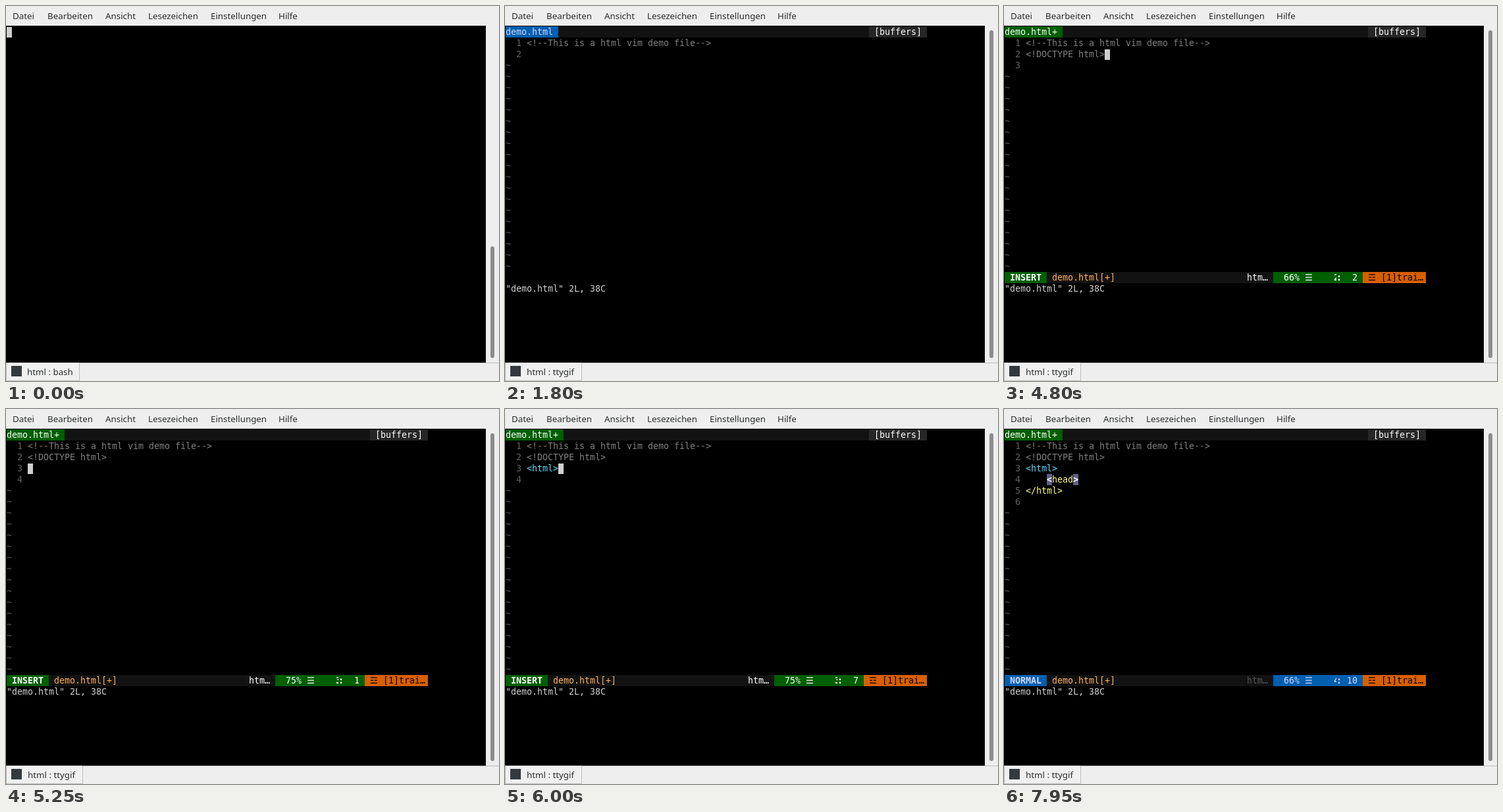
An HTML page with a canvas that plays this animation: 749x571 px, repeating every 8000 ms.

```html
<!DOCTYPE html>
<html lang="de">
<head>
<meta charset="utf-8">
<title>Terminal</title>
<style>
html, body { margin: 0; width: 100%; height: 100%; overflow: hidden; background: #eee; }
canvas { display: block; }
</style>
</head>
<body>
<canvas id="stage" width="749" height="571"></canvas>
<script>
const g = document.getElementById('stage').getContext('2d');
const LOOP = 8000, CELL = 8, ROW = 17, LEFT = 1, TOP = 31;
const MONO = '13.333px "DejaVu Sans Mono", monospace';
const SANS = '13.333px "Noto Sans", sans-serif';
const BLUE = '#005faf', GREEN = '#005f00', DARK = '#121212', DIM = '#585858',
  LILAC = '#d7d7ff', LIGHT = '#d0d0d0', AMBER = '#ffaf5f';
const INK = { g: '#808080', y: '#ffff87', c: '#5fd7ff' };
const MENU = [['Datei', 10], ['Bearbeiten', 63], ['Ansicht', 151],
  ['Lesezeichen', 216], ['Einstellungen', 311], ['Hilfe', 414]];
const CHOICES = ['html', ...['HTML 5', 'HTML 3.2 Final', 'HTML 4.0', 'HTML 4.0 Transitional',
  'HTML 4.0 Frameset', 'HTML 4.01', 'HTML 4.01 Transitional', 'HTML 4.01 Frameset',
  'XHTML 1.0 Strict', 'XHTML 1.0 Transitional', 'XHTML 1.0 Frameset', 'XHTML 1.1']
  .map(s => 'DOCTYPE ' + s)];
const PROMPT = '~/vim/html$ ';

// Buffer lines: the first letter picks the ink
const NOTE = 'g<!--This is a html vim demo file-->', TYPE = 'g<!DOCTYPE html>';
const HEAD = [NOTE, TYPE], OPEN = [...HEAD, 'c<html>'];

// Each step changes part of the state; at = [line, column] of the cursor, pos = status bar
const steps = [
  [0, { shell: '' }],
  ...['', 'v', 'vi', 'vim', 'vim ', 'vim d', 'vim demo.html ']
    .map((s, i) => [150 * (i + 1), { shell: PROMPT + s }]),
  [1200, { enter: true }],
  [1350, { vim: true }],
  [1500, { message: true }],
  [1800, { lines: [NOTE, ''] }],
  [4050, { mode: 'NORMAL', pos: [50, 1, 1], at: [1, 1] }],
  [4200, { mode: 'INSERT', changed: true, tab: true, lines: [NOTE, '', ''], pos: [66, 2, 1], at: [2, 1] }],
  [4350, { lines: [NOTE, 'y<', ''], pos: [66, 2, 2], at: [2, 2] }],
  [4500, { lines: [NOTE, 'y<html', ''], at: [2, 6], pick: 0 }],
  [4650, { lines: [...HEAD, ''], at: [2, 16], pick: 1 }],
  [4800, { pick: -1 }],
  [4950, { pos: [66, 2, 16] }],
  [5250, { lines: [...HEAD, '', ''], pos: [75, 3, 1], at: [3, 1] }],
  ...['<', '<h', '<ht'].map((s, i) => [5400 + 150 * i,
    { lines: [...HEAD, 'y' + s, ''], pos: [75, 3, s.length + 1], at: [3, s.length + 1] }]),
  [5850, { lines: [...HEAD, 'y<html', ''], at: [3, 6], pick: 0 }],
  [6000, { lines: [...OPEN, ''], pos: [75, 3, 7], at: [3, 7], pick: -1 }],
  [6150, { lines: [...HEAD, 'c<html></html>', ''] }],
  [6450, { lines: [...OPEN, 'c</html>', ''], pos: [80, 4, 1], at: [4, 1] }],
  [6750, { lines: [...OPEN, '', 'c</html>', ''] }],
  [6900, { pos: [66, 4, 1] }],
  [7050, { pos: [66, 4, 5], at: [4, 5] }],
  ...['<', '<h', '<he', '<head'].map((s, i) => [7200 + 150 * i,
    { lines: [...OPEN, 'y    ' + s, 'y</html>', ''], pos: [66, 4, s.length + 5], at: [4, s.length + 5] }]),
  [7800, { lines: [...OPEN, 'y    <head>', 'y</html>', ''], pos: [66, 4, 11], at: [4, 11] }],
  [7950, { mode: 'NORMAL', pos: [66, 4, 10], at: null, pair: [[4, 5], [4, 10]] }]
];

function box(x, y, w, h, color) {
  g.fillStyle = color;
  g.fillRect(x, y, w, h);
}

function label(s, x, y) {
  g.font = SANS;
  g.fillStyle = '#2a2c2e';
  g.fillText(s, x, y);
}

const colX = c => LEFT + c * CELL, rowY = r => TOP + r * ROW;

function band(col, row, n, color) { box(colX(col), rowY(row), n * CELL, ROW, color); }

function put(s, col, row, color, bold, shift = 0) {
  g.font = (bold ? 'bold ' : '') + MONO;
  g.fillStyle = color;
  [...s].forEach((ch, i) => {
    if (ch !== ' ') g.fillText(ch, colX(col + i) + shift, rowY(row) + 13);
  });
}

function cursor(col, row, color = LIGHT) { box(colX(col), rowY(row) + 1, CELL, ROW - 1, color); }

function drawFrame(vim) {
  box(0, 0, 749, 571, '#eeeeee');
  MENU.forEach(([s, x]) => label(s, x, 20));
  box(0, 30, 729, 513, '#000');
  const top = vim ? 37 : 366, w = vim ? 117 : 112;
  g.fillStyle = '#8c8c8c';
  g.beginPath();
  g.roundRect(736, top, 6, 536 - top, 3);
  g.fill();
  box(0, 543, 749, 1, '#bcbcbc');
  box(0, 543, w, 28, '#bcbcbc');
  box(1, 543, w - 2, 27, '#f0f0f0');
  box(8, 548, 16, 16, '#33393c');
  label(vim ? 'html : ttygif' : 'html : bash', vim ? 33 : 32, 562);
}

function drawShell(s) {
  put(s.shell, 0, 0, LIGHT);
  if (s.enter) cursor(0, 1);
  else cursor(s.shell.length, 0);
}

function drawStatus(s) {
  const insert = s.mode === 'INSERT';
  const back = insert ? GREEN : BLUE, ink = insert ? '#fff' : LILAC;
  const [percent, line, col] = s.pos;
  band(0, 22, 80, DARK);
  band(0, 22, 8, back);
  put(s.mode, 1, 22, ink, true);
  put('demo.html' + (s.changed ? '[+]' : ''), 9, 22, s.changed ? AMBER : DIM);
  put('htm…', 46, 22, insert ? '#fff' : DIM);
  band(51, 22, 17, back);
  put(percent + '% ☰', 53, 22, ink);
  // The wide sign pushes the line digit under the colon's cell
  g.save();
  g.beginPath();
  g.rect(501, 405, 4, ROW);
  g.clip();
  put(String(line), 62, 22, ink, true, 4);
  g.restore();
  put(':', 63, 22, ink, true);
  put(String(col).padStart(2), 65, 22, ink);
  band(68, 22, 12, '#d75f00');
  put('☲', 69, 22, '#000');
  put('[1]trai…', 71, 22, '#000', false, 4);
}

function drawPopup(pick, row) {
  CHOICES.forEach((s, i) => {
    const on = i === pick;
    band(4, row + i, 32, on ? '#eeeeee' : DIM);
    put(s, 5, row + i, on ? '#000' : '#fff');
  });
}

function drawVim(s) {
  if (s.message) put('"demo.html" 2L, 38C', 0, 23, LIGHT);
  if (!s.lines) return;
  band(0, 0, 80, DARK);
  band(0, 0, s.tab ? 11 : 10, s.tab ? GREEN : BLUE);
  put('demo.html' + (s.tab ? '+' : ''), 0, 0, s.tab ? '#fff' : LILAC);
  band(69, 0, 11, '#262626');
  put('[buffers]', 70, 0, '#fff');
  for (let row = 1; row <= 21; row++) {
    const line = s.lines[row - 1];
    if (line === undefined) {
      put('~', 0, row, DIM);
      continue;
    }
    put(String(row), 2, row, '#626262');
    put(line.slice(1), 4, row, INK[line[0]]);
  }
  const charAt = (row, col) => s.lines[row - 1][col] || '';
  if (s.at) {
    const [row, col] = s.at, ch = charAt(row, col);
    cursor(col + 3, row, ch ? INK[s.lines[row - 1][0]] : LIGHT);
    put(ch, col + 3, row, '#000');
  }
  (s.pair || []).forEach(([row, col]) => {
    band(col + 3, row, 1, '#5f5f87');
    put(charAt(row, col), col + 3, row, '#fff', true);
  });
  if (s.mode) drawStatus(s);
  if (s.pick >= 0) drawPopup(s.pick, s.at[0] + 1);
}

function tick(now) {
  const t = now % LOOP, s = {};
  for (const [start, change] of steps) if (t >= start) Object.assign(s, change);
  drawFrame(s.vim);
  if (s.vim) drawVim(s);
  else drawShell(s);
  requestAnimationFrame(tick);
}

const begin = performance.now();
(function run() {
  const loop = () => tick(Math.max(0, performance.now() - begin));
  loop();
})();
</script>
</body>
</html>
```
